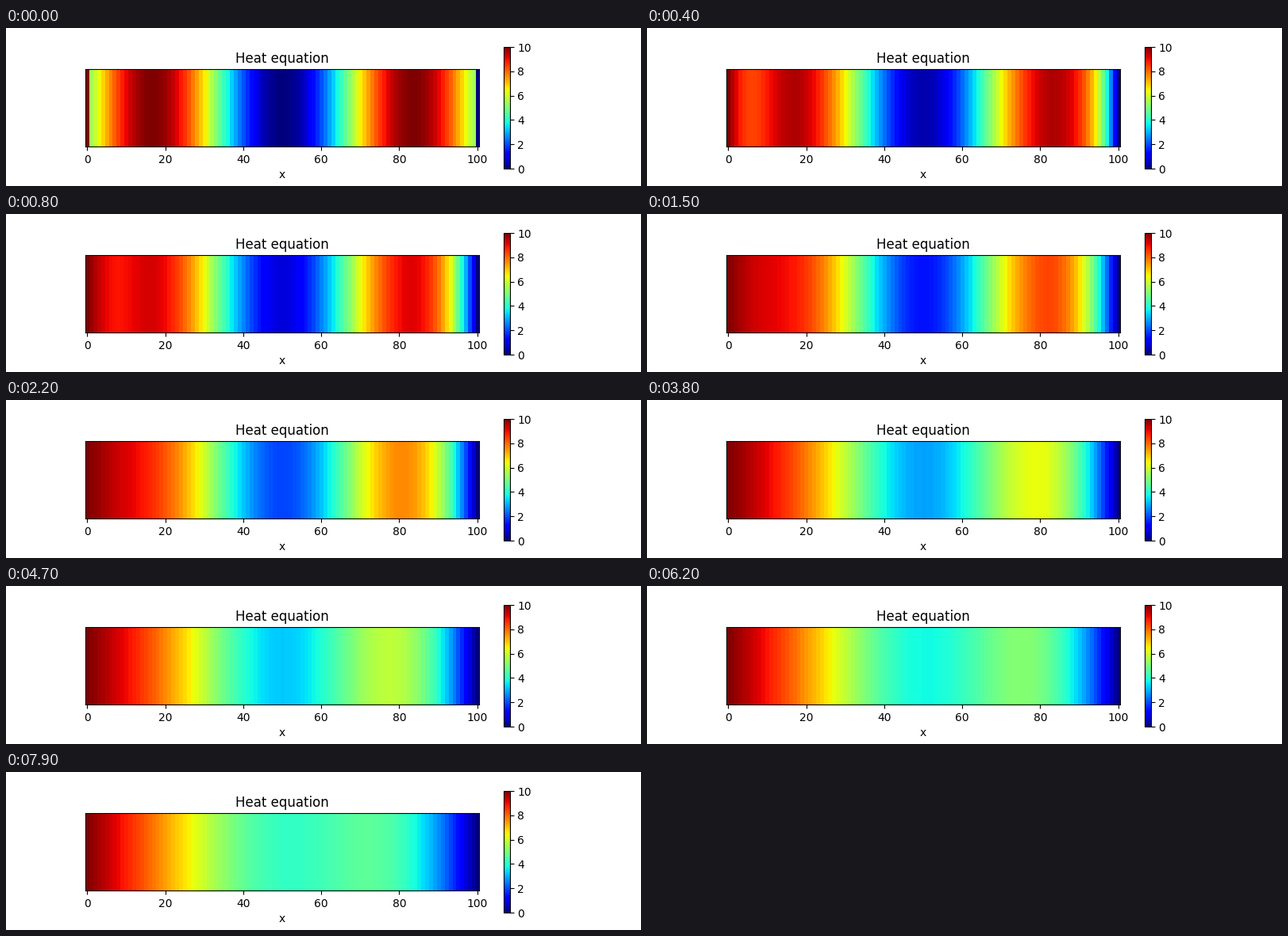
Recreate the animation shown at these times as a matplotlib script. Size 800 px wide and 200 px high, loop 8 s.

```python
import numpy as np
import matplotlib.pyplot as plt
from matplotlib.animation import FuncAnimation

LENGTH = 100          # rod length, dx = 1
ROWS = 20             # thickness of the drawn strip
FRAMES = 80
STEPS_PER_FRAME = 10
ALPHA = 2.0
DT = 1 / (4 * ALPHA)
GAMMA = ALPHA * DT


def solve():
    """Explicit finite differences, hot left end and cold right end."""
    x = np.arange(LENGTH + 1)
    u = 5 + 5 * np.sin(3 * np.pi * x / LENGTH)
    u[0], u[-1] = 10, 0
    history = [u.copy()]
    for _ in range(FRAMES - 1):
        for _ in range(STEPS_PER_FRAME):
            u[1:-1] += GAMMA * (u[2:] - 2 * u[1:-1] + u[:-2])
        history.append(u.copy())
    return history


def strip(u):
    return np.tile(u, (ROWS, 1))


history = solve()

fig, ax = plt.subplots(figsize=(8, 2), dpi=100)
image = ax.imshow(strip(history[0]), cmap="jet", vmin=0, vmax=10,
                  interpolation="nearest")
ax.set_title("Heat equation")
ax.set_xlabel("x")
ax.set_yticks([])
fig.colorbar(image, ax=ax)


def update(i):
    image.set_data(strip(history[i]))
    return (image,)


anim = FuncAnimation(fig, update, frames=FRAMES, interval=100,
                     repeat=True, repeat_delay=0)
plt.show()
```
